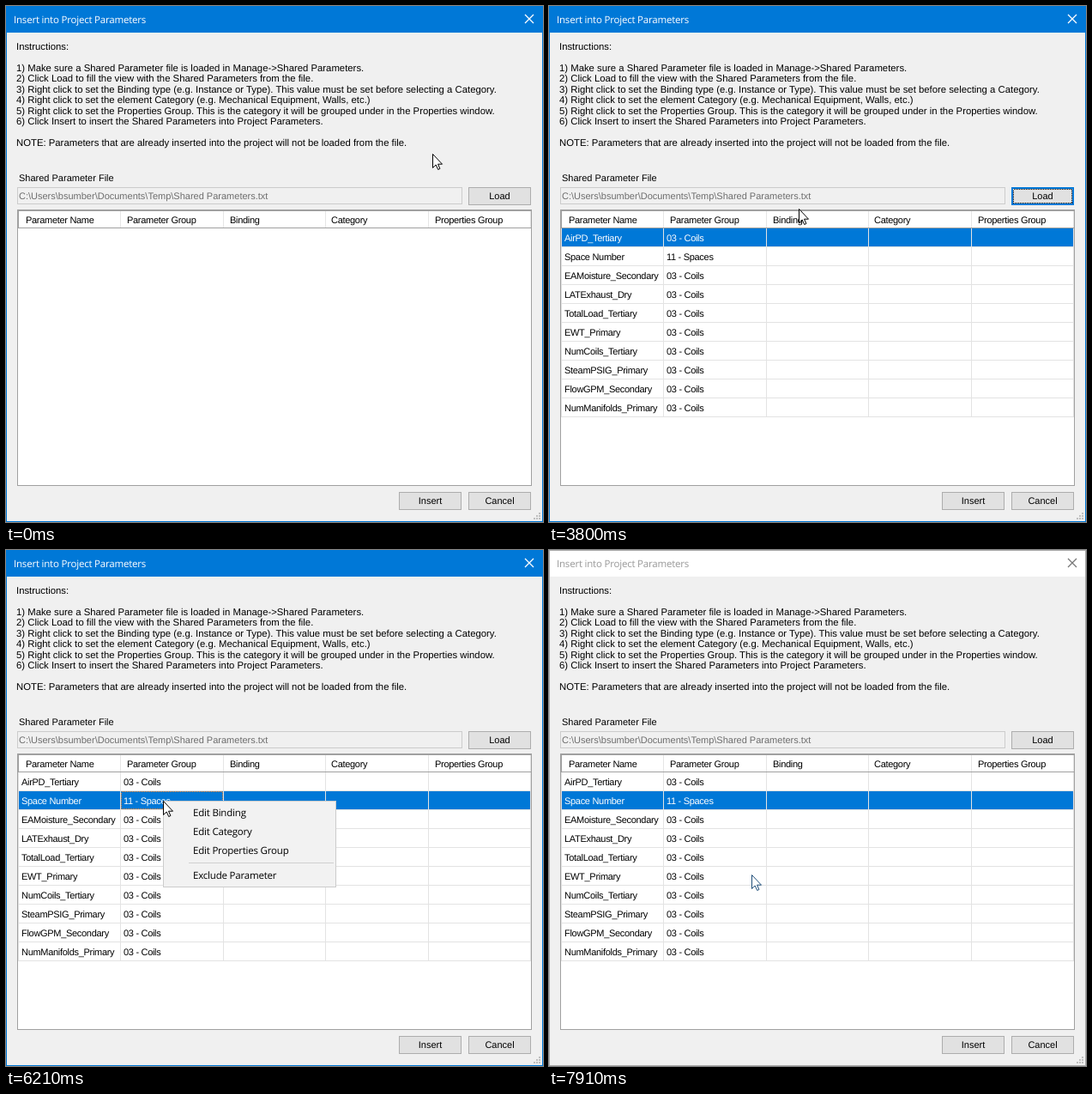
An HTML page that plays this animation: 626 px wide and 601 px high, repeating every 7.99 s.

```html
<!DOCTYPE html>
<html lang="en">
<head>
<meta charset="utf-8">
<title>Insert into Project Parameters</title>
<style>
  html, body { margin: 0; width: 100%; height: 100%; overflow: hidden; background: #f0f0f0; }
  svg { display: block; width: 626px; height: 601px; }
  rect { shape-rendering: crispEdges; }
  text { font: 11px "Liberation Sans", sans-serif; text-rendering: geometricPrecision; fill: #000; white-space: pre; }
  .note { font-size: 11.33px; }
  .cell { letter-spacing: -.3px; }
  .ui { font: 11.5px "Open Sans", sans-serif; letter-spacing: -.2px; }
  .path { fill: #6d6d6d; }
  .mid { text-anchor: middle; }
  .selected text { fill: #fff; }
  .dots { fill: none; stroke-dasharray: 1 1; }
</style>
</head>
<body>
<svg id="stage" viewBox="0 0 626 601"></svg>
<script>
const BLUE = '#0078d7', LINE = '#e3e3e3', EDGE = '#a0a0a0';
const LOOP = 7990;

const notes = [
  'Instructions:', '',
  '1) Make sure a Shared Parameter file is loaded in Manage->Shared Parameters.',
  '2) Click Load to fill the view with the Shared Parameters from the file.',
  '3) Right click to set the Binding type (e.g. Instance or Type). This value must be set before selecting a Category.',
  '4) Right click to set the element Category (e.g. Mechanical Equipment, Walls, etc.)',
  '5) Right click to set the Properties Group. This is the category it will be grouped under in the Properties window.',
  '6) Click Insert to insert the Shared Parameters into Project Parameters.', '',
  'NOTE: Parameters that are already inserted into the project will not be loaded from the file.'
];
const columns = [
  { x: 14, label: 23, name: 'Parameter Name' },
  { x: 133, label: 141, name: 'Parameter Group' },
  { x: 253, label: 261, name: 'Binding' },
  { x: 372, label: 379, name: 'Category' },
  { x: 492, label: 500, name: 'Properties Group' }
];
const rows = ['AirPD_Tertiary', 'Space Number', 'EAMoisture_Secondary', 'LATExhaust_Dry', 'TotalLoad_Tertiary',
  'EWT_Primary', 'NumCoils_Tertiary', 'SteamPSIG_Primary', 'FlowGPM_Secondary', 'NumManifolds_Primary'];
const menuItems = [
  { y: 295, name: 'Edit Binding' },
  { y: 317, name: 'Edit Category' },
  { y: 339, name: 'Edit Properties Group' },
  { y: 368, name: 'Exclude Parameter' }
];

// Cursor moves: ease slows the end, bend curves the path vertically.
const moves = [
  { start: 80, end: 150, steps: 2, from: [497, 172], to: [502, 180], ease: 1, bend: 1 },
  { start: 390, end: 1090, steps: 10, from: [502, 180], to: [566, 214], ease: 1.2, bend: 1 },
  { start: 3180, end: 3950, steps: 11, from: [566, 214], to: [244, 250], ease: 1.13, bend: 3.13 },
  { start: 4030, end: 4500, steps: 7, from: [244, 250], to: [183, 292], ease: 1.2, bend: 1 },
  { start: 6840, end: 7610, steps: 11, from: [183, 292], to: [236, 378], ease: 1.45, bend: 1.21 }
];
const clicks = [[1850, 2100], [5280, 5510], [5980, 6210]];

const escapeText = s => s.replace(/&/g, '&amp;').replace(/>/g, '&gt;');
const text = (x, y, s, cls = '', id = '') => `<text x="${x}" y="${y}" class="${cls}" id="${id}">${escapeText(s)}</text>`;
const rect = (x, y, w, h, fill, extra = '') => `<rect x="${x}" y="${y}" width="${w}" height="${h}" fill="${fill}" ${extra}/>`;
const frame = (x, y, w, h, fill, stroke, extra = '') => rect(x + .5, y + .5, w - 1, h - 1, fill, `stroke="${stroke}" ${extra}`);
const group = (id, body) => `<g id="${id}">${body}</g>`;
const button = (x, y, s, id = '') =>
  frame(x, y, 73, 21, '#e1e1e1', '#adadad', `id="${id}"`) + text(x + 36.5, y + 14, s, 'mid');

function windowParts() {
  const grip = [0, 1, 2].flatMap(i => [0, 1, 2].filter(j => i + j > 1)
    .map(j => rect(615 + 3 * i, 590 + 3 * j, 2, 2, '#bfbfbf'))).join('');
  return frame(0, 0, 626, 601, '#f0f0f0', BLUE, 'id="border"')
    + rect(0, 0, 626, 31, BLUE, 'id="bar"')
    + text(9, 20, 'Insert into Project Parameters', 'ui', 'title')
    + '<path id="close" d="M605 10L615 20M615 10L605 20" fill="none" stroke-width="1.3"/>'
    + notes.map((s, i) => text(12, Math.round(51 + 12.45 * i), s, 'note')).join('')
    + text(15, 204, 'Shared Parameter File')
    + frame(13, 211, 519, 20, '#f0f0f0', '#cccccc')
    + text(15, 225, 'C:\\Users\\bsumber\\Documents\\Temp\\Shared Parameters.txt', 'path')
    + button(539, 211, 'Load', 'load')
    + group('loadFocus', frame(540, 212, 71, 19, 'none', BLUE)
      + frame(541, 213, 69, 17, 'none', '#000', 'class="dots"'))
    + button(458, 566, 'Insert') + button(539, 566, 'Cancel') + grip;
}

function tableParts() {
  const header = columns.map((c, i) => {
    const right = i < 4 ? columns[i + 1].x : 611;
    return rect(c.x + 1, 239, right - c.x - 1, 19, '#fff', `id="head${i}"`)
      + rect(right, 239, 1, 19, '#e5e5e5') + text(c.label, 253, c.name, 'cell');
  }).join('');
  const body = rows.map((name, i) => group('row' + i,
    text(18, 274 + 22 * i, name, 'cell')
    + text(137, 274 + 22 * i, i === 1 ? '11 - Spaces' : '03 - Coils', 'cell'))).join('');
  const rowLines = rows.map((_, i) => rect(15, 280 + 22 * i, 597, 1, LINE)).join('');
  const columnLines = [...columns.map(c => c.x), 611].map(x => rect(x, 259, 1, 220, LINE)).join('');
  return frame(13, 237, 600, 322, '#fff', EDGE)
    + rect(14, 238, 598, 1, EDGE) + rect(14, 238, 1, 21, EDGE)
    + header + rect(14, 258, 598, 1, EDGE)
    + group('rows', rect(15, 259, 596, 21, BLUE, 'id="selection"') + rowLines + columnLines + body)
    + frame(134, 281, 119, 21, 'none', '#ff8728', 'class="dots" id="cellFocus"');
}

function menuParts() {
  return frame(183, 292, 202, 101, '#f2f2f2', '#cccccc')
    + rect(186, 317, 196, 22, '#91c9f7', 'id="menuHot"')
    + rect(213, 364, 169, 1, '#d0d0d0')
    + menuItems.map(m => text(218, m.y + 15, m.name, 'ui')).join('');
}

document.getElementById('stage').innerHTML = windowParts() + tableParts() + group('menu', menuParts())
  + '<circle id="halo" r="12" fill="#ebd728" fill-opacity=".75"/>'
  + '<path id="cursor" d="M.5.5V16.5L4.2 13 6.7 18.5 8.9 17.5 6.5 12.2H11.5Z" fill="#fff"/>';

const el = id => document.getElementById(id);
const set = (id, attrs) => Object.entries(attrs).forEach(([k, v]) => el(id).setAttribute(k, v));
const show = (id, on) => set(id, { visibility: on ? 'visible' : 'hidden' });

function cursorAt(t) {
  const move = moves.filter(m => t >= m.start).pop();
  if (!move) return moves[0].from;
  const { start, end, steps, from, to, ease, bend } = move;
  const step = Math.min(steps - 1, Math.floor((t - start) / (end - start) * (steps - 1) + .25));
  const p = 1 - (1 - (step + 1) / steps) ** ease;
  return [from[0] + (to[0] - from[0]) * p, from[1] + (to[1] - from[1]) * p ** bend].map(Math.round);
}

function draw(t) {
  const [x, y] = cursorAt(t);
  const active = t < 7910, loaded = t >= 2100, picked = t >= 5280;
  const pressed = t >= 1850 && t < 2100, focused = t >= 1850 && !picked;
  const menuOpen = t >= 6210 && active;
  const overLoad = x >= 539 && x < 612 && y >= 211 && y < 232;

  set('border', { stroke: active ? BLUE : '#aaaaaa' });
  set('bar', active ? { x: 0, y: 0, width: 626, height: 31, fill: BLUE } : { x: 1, y: 1, width: 624, height: 30, fill: '#fff' });
  el('title').style.fill = active ? '#fff' : '#999';
  set('close', { stroke: active ? '#fff' : '#777' });

  set('load', {
    fill: pressed ? '#cce4f7' : overLoad ? '#e5f1fb' : '#e1e1e1',
    stroke: pressed ? '#005499' : overLoad || focused ? BLUE : '#adadad'
  });
  show('loadFocus', focused && !pressed);

  columns.forEach((c, i) => {
    const right = i < 4 ? columns[i + 1].x : 611;
    const hot = y >= 239 && y < 259 && x > c.x && x <= right;
    set('head' + i, { fill: hot ? '#d9ebf9' : '#fff' });
  });
  show('rows', loaded);
  const selected = picked ? 1 : 0;
  set('selection', { y: 259 + 22 * selected });
  rows.forEach((_, i) => set('row' + i, { class: i === selected ? 'selected' : '' }));
  show('cellFocus', picked && active);

  const item = menuItems.find(m => y >= m.y && y < m.y + 22);
  show('menu', menuOpen);
  show('menuHot', menuOpen && item);
  if (item) set('menuHot', { y: item.y });

  show('halo', clicks.some(([from, to]) => t >= from && t < to));
  set('halo', { cx: x, cy: y });
  set('cursor', { transform: `translate(${x} ${y})`, stroke: active ? '#000' : '#1f4e79' });
}

const origin = performance.now();
function tick() {
  draw((performance.now() - origin) % LOOP);
  requestAnimationFrame(tick);
}
tick();
</script>
</body>
</html>
```
